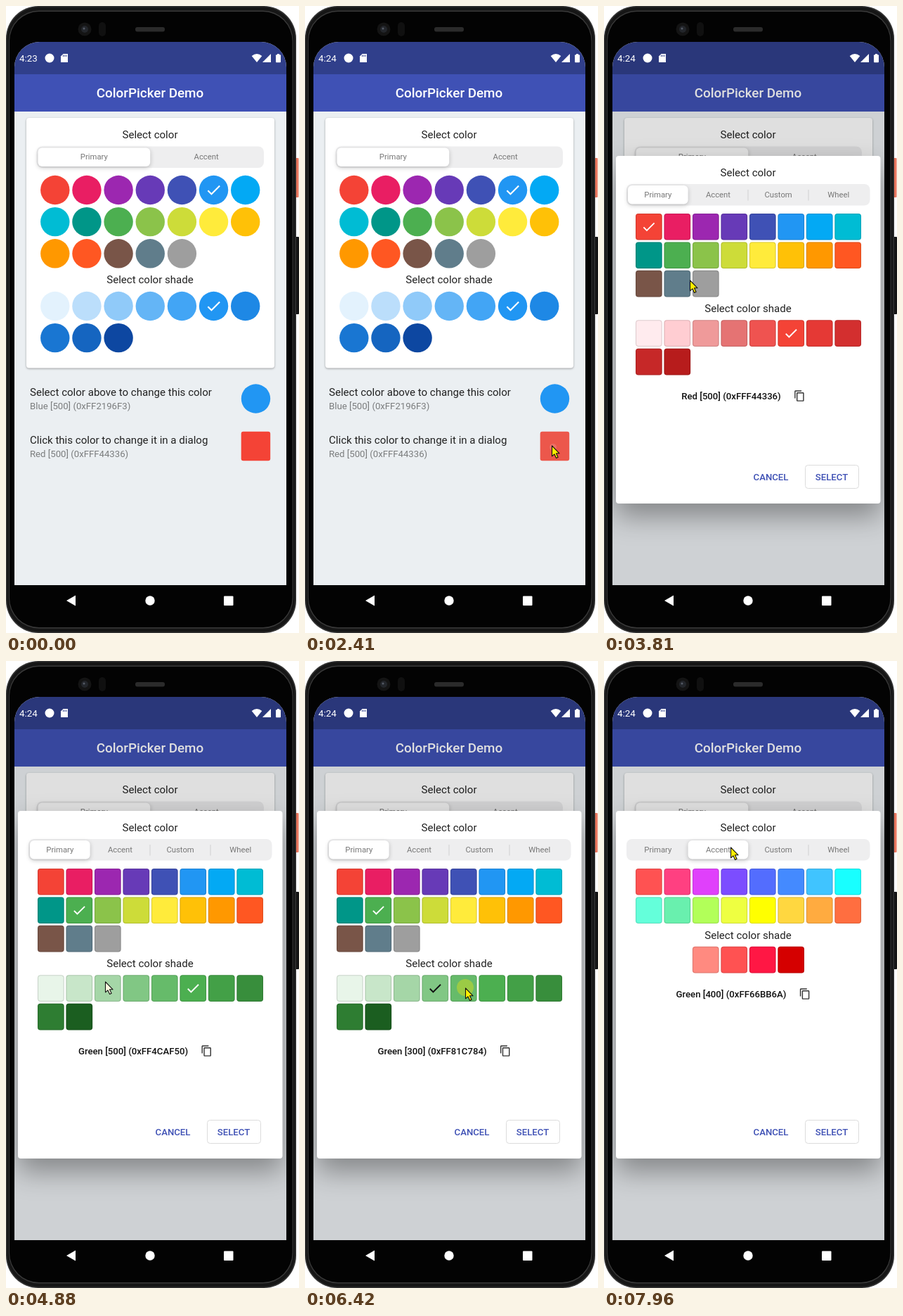
An HTML page with a canvas for the animation above (8 s loop, 417 by 891 pixels).

```html
<!DOCTYPE html>
<html lang="en">
<head>
<meta charset="utf-8">
<title>ColorPicker Demo</title>
<style>
html, body { margin: 0; width: 100%; height: 100%; overflow: hidden; background: #fff; }
canvas { display: block; }
</style>
</head>
<body>
<canvas id="stage" width="417" height="891"></canvas>
<script>
const c = document.getElementById('stage').getContext('2d');
const LOOP = 8000;
const hex = s => s.split(' ').map(v => '#' + v);

const primary = hex('F44336 E91E63 9C27B0 673AB7 3F51B5 2196F3 03A9F4 00BCD4 009688 4CAF50 8BC34A CDDC39 FFEB3B FFC107 FF9800 FF5722 795548 607D8B 9E9E9E');
const accent = hex('FF5252 FF4081 E040FB 7C4DFF 536DFE 448AFF 40C4FF 18FFFF 64FFDA 69F0AE B2FF59 EEFF41 FFFF00 FFD740 FFAB40 FF6E40');
const blues = hex('E3F2FD BBDEFB 90CAF9 64B5F6 42A5F5 2196F3 1E88E5 1976D2 1565C0 0D47A1');
const reds = hex('FFEBEE FFCDD2 EF9A9A E57373 EF5350 F44336 E53935 D32F2F C62828 B71C1C');
const greens = hex('E8F5E9 C8E6C9 A5D6A7 81C784 66BB6A 4CAF50 43A047 388E3C 2E7D32 1B5E20');
const redAccents = hex('FF8A80 FF5252 FF1744 D50000');

// Dialog selections: start time, primary index, shades, shade index, label
const picks = [
  [2640, 0, reds, 5, 'Red [500] (0xFFF44336)'],
  [4270, 9, greens, 5, 'Green [500] (0xFF4CAF50)'],
  [5180, 9, greens, 2, 'Green [200] (0xFFA5D6A7)'],
  [5800, 9, greens, 3, 'Green [300] (0xFF81C784)'],
  [6570, 9, greens, 4, 'Green [400] (0xFF66BB6A)']
];
// Pointer tip: time, x, y
const path = [
  [1020, 410, 657], [1330, 351, 624], [3420, 351, 624], [3810, 122, 389],
  [4110, 112, 339], [4430, 112, 339], [4880, 141, 455], [5030, 145, 462],
  [5180, 145, 462], [5420, 197, 464], [5800, 197, 464], [6040, 228, 464],
  [6570, 228, 464], [7030, 180, 275], [7110, 180, 264]
];
const clicks = [[2260, 2400], [4110, 4270], [5030, 5180], [5570, 5800], [6420, 6570], [7260, 7420]];

const checkIcon = new Path2D('M9 16.17L4.83 12l-1.42 1.41L9 19 21 7l-1.41-1.41z');
const copyIcon = new Path2D('M16 1H4c-1.1 0-2 .9-2 2v14h2V3h12V1zm3 4H8c-1.1 0-2 .9-2 2v14c0 1.1.9 2 2 2h11c1.1 0 2-.9 2-2V7c0-1.1-.9-2-2-2zm0 16H8V7h11v14z');
const arrow = new Path2D('M0 0V15L3.4 12L6.1 17.6L8.6 16.4L6 11H10.6Z');

const ease = p => { p = Math.min(1, Math.max(0, p)); return p * p * (3 - 2 * p); };

function rect(x, y, w, h, r, fill) {
  c.beginPath();
  c.roundRect(x, y, w, h, r);
  c.fillStyle = fill;
  c.fill();
}
function outline(x, y, w, h, r, color) {
  c.beginPath();
  c.roundRect(x, y, w, h, r);
  c.strokeStyle = color;
  c.lineWidth = 1;
  c.stroke();
}
function disc(x, y, r, fill) {
  c.beginPath();
  c.arc(x, y, r, 0, 7);
  c.fillStyle = fill;
  c.fill();
}
function poly(fill, ...p) {
  c.beginPath();
  for (let i = 0; i < p.length; i += 2) c.lineTo(p[i], p[i + 1]);
  c.fillStyle = fill;
  c.fill();
}
function text(s, x, y, size, fill, weight = 400, align = 'center') {
  c.font = `${weight} ${size}px Roboto, sans-serif`;
  c.textAlign = align;
  c.fillStyle = fill;
  c.fillText(s, x, y);
}
function icon(shape, x, y, size, fill) {
  c.save();
  c.translate(x - size / 2, y - size / 2);
  c.scale(size / 24, size / 24);
  c.fillStyle = fill;
  c.fill(shape);
  c.restore();
}
function raised(x, y, w, h, r, dy, blur, alpha) {
  c.save();
  c.shadowColor = `rgba(0,0,0,${alpha})`;
  c.shadowBlur = blur;
  c.shadowOffsetY = dy;
  rect(x, y, w, h, r, '#fff');
  c.restore();
}

function phone() {
  c.fillStyle = '#fff';
  c.fillRect(0, 0, 417, 891);
  rect(411, 216, 5.5, 56, 1, '#e8755c');
  rect(411, 328, 6, 110, 1, '#151515');
  rect(0, 0, 413, 891, 46, '#333');
  rect(1.5, 1.5, 410, 888, 45, '#161616');
  rect(4, 6.5, 404.5, 878, 43, '#3a3a3a');
  rect(5, 8, 402.5, 875, 42, '#030303');
  rect(184, 30, 42, 6.5, 3, '#2b2b2b');
  disc(112, 33, 9.5, '#141414');
  disc(112, 33, 5, '#23262b');
  disc(111, 32, 1.5, '#555b66');
  rect(132, 23, 10, 20, 5, '#101010');
  poly('#fff', 86, 845, 99, 837.5, 99, 852.5);
  disc(205, 845, 6.7, '#fff');
  rect(310, 838.5, 13.5, 13.5, 1, '#fff');
}

function status(t) {
  text(t < 240 ? '4:23' : '4:24', 19, 79, 13.4, '#fff', 400, 'left');
  disc(62, 74, 6.5, '#fff');
  poly('#fff', 81.5, 68, 88, 68, 88, 80, 78, 80, 78, 71.5);
  c.fillStyle = '#303f8b';
  for (let i = 0; i < 3; i++) c.fillRect(81 + 2.2 * i, 69.5, 1, 2.5);
  c.beginPath();
  c.moveTo(357, 80);
  c.lineTo(349.7, 71);
  c.quadraticCurveTo(357, 65, 364.3, 71);
  c.fillStyle = '#fff';
  c.fill();
  poly('#fff', 377, 68, 377, 80, 365, 80);
  rect(384, 69.3, 7, 11, 1, '#fff');
  c.fillRect(386, 68, 3, 2);
}

function tabs(x, y, w, h, names, pos) {
  rect(x, y, w, h, 8, '#eeeeef');
  const x0 = x + 2, step = (w - 4) / names.length, left = x0 + step * pos;
  names.forEach((n, i) => {
    const d = x0 + step * i;
    if (i && Math.abs(d - left) > 5 && Math.abs(d - left - step) > 5) {
      c.fillStyle = '#d0d0d2';
      c.fillRect(Math.round(d) - 0.5, y + 8, 1, h - 15);
    }
  });
  raised(left, y + 2, step, h - 4, 6, 2, 6, 0.22);
  names.forEach((n, i) => text(n, x0 + step * (i + 0.5), Math.floor(y + h / 2 + 4), 11.3, '#777'));
}

function circles(colors, y, sel) {
  colors.forEach((col, i) => {
    const cx = 69.8 + 45.15 * (i % 7), cy = y + 45.15 * Math.floor(i / 7);
    disc(cx, cy, 20.7, col);
    if (i === sel) icon(checkIcon, cx, cy, 24.9, '#fff');
  });
}

function squares(colors, x, y, sel, mark = '#fff') {
  colors.forEach((col, i) => {
    const sx = x + 40.48 * (i % 8), sy = y + 40.48 * Math.floor(i / 8);
    rect(sx, sy, 37.66, 37.66, 3.8, col);
    outline(sx + 0.5, sy + 0.5, 36.66, 36.66, 3.3, 'rgba(0,0,0,.14)');
    if (i === sel) icon(checkIcon, sx + 18.8, sy + 18.8, 22.6, mark);
  });
}

function page(t) {
  c.fillStyle = '#ebeff2';
  c.fillRect(12, 51, 387, 772);
  c.fillStyle = '#303f8b';
  c.fillRect(12, 51, 387, 46);
  c.fillStyle = '#3f51b5';
  c.fillRect(12, 97, 387, 53);
  text('ColorPicker Demo', 205, 130, 18.83, '#fff', 500);

  raised(29, 159, 353, 355.5, 4, 1, 3, 0.35);
  text('Select color', 205, 188, 15.07, '#222');
  tabs(43.5, 199.5, 323.5, 30.5, ['Primary', 'Accent'], 0);
  circles(primary, 261.5, 5);
  text('Select color shade', 205, 394, 15.07, '#222');
  circles(blues, 426.5, 5);

  text('Select color above to change this color', 34, 554, 15.07, '#222', 400, 'left');
  text('Blue [500] (0xFF2196F3)', 34, 573, 13.18, '#7b7d7e', 400, 'left');
  disc(355.5, 558, 20.7, '#2196f3');
  text('Click this color to change it in a dialog', 34, 622, 15.07, '#222', 400, 'left');
  text('Red [500] (0xFFF44336)', 34, 641, 13.18, '#7b7d7e', 400, 'left');
  rect(334.7, 604.7, 41.5, 41.5, 3, t >= 2340 ? '#ec574b' : '#f44336');
  if (t >= 2400) disc(353, 627, 5, 'rgba(255,255,255,.15)');
}

function dialog(t) {
  c.fillStyle = 'rgba(0,0,0,.125)';
  c.fillRect(12, 51, 387, 772);
  raised(17, 213, 376.5, 494, 4, 18, 38, 0.36);
  const [, main, shades, shade, label] = picks.filter(p => t >= p[0]).pop();
  const p = ease((t - 7420) / 460), up = 40.48 * p;

  text('Select color', 205, 242, 15.07, '#222');
  tabs(32, 253, 346.5, 30.5, ['Primary', 'Accent', 'Custom', 'Wheel'], ease((t - 7340) / 260));

  c.globalAlpha = 1 - p;
  squares(primary, 45, 294.9, main);
  squares(shades, 45, 446.3 - up, shade, shade < 5 ? '#111' : '#fff');
  c.globalAlpha = p;
  squares(accent, 45, 294.9);
  squares(redAccents, 125.9, 446.3 - up);
  c.globalAlpha = 1;

  text('Select color shade', 205, 435 - up, 15.07, '#222');
  text(label, 181, 559 - 2 * up, 13.18, '#111', 500);
  icon(copyIcon, 181 + c.measureText(label).width / 2 + 26.5, 554 - 2 * up, 17, '#333');

  text('CANCEL', 237.5, 674, 13.18, '#3f51b5', 500);
  outline(286.5, 652.5, 76, 33, 4, '#dcdcdc');
  text('SELECT', 324, 674, 13.18, '#3f51b5', 500);
}

// The pointer advances in steps of about 77 ms.
function tip(t) {
  const i = path.findIndex(k => k[0] > t);
  if (i < 0) return path[path.length - 1].slice(1);
  const [t0, x0, y0] = path[i - 1], [t1, x1, y1] = path[i];
  const p = ease(Math.floor((t - t0 + 4) / 77) * 77 / (t1 - t0));
  return [x0 + (x1 - x0) * p, y0 + (y1 - y0) * p];
}

function pointer(t) {
  if (t < path[0][0]) return;
  const [x, y] = tip(t);
  const click = clicks.find(k => t >= k[0] && t < k[1]);
  if (click) disc(x, y, 12, `rgba(255,235,0,${t - click[0] < 75 ? 0.35 : 0.65})`);
  c.save();
  c.translate(x + 0.5, y + 0.8);
  c.lineJoin = 'round';
  c.lineWidth = 1.1;
  c.strokeStyle = '#111';
  c.fillStyle = t >= 4800 && t < 5110 ? '#fdfbe0' : '#ffee00';
  c.fill(arrow);
  c.stroke(arrow);
  c.restore();
}

function draw(now) {
  const t = now % LOOP;
  phone();
  c.save();
  c.beginPath();
  c.roundRect(12, 51, 387, 772, [36, 36, 0, 0]);
  c.clip();
  page(t);
  if (t >= 2640) dialog(t);
  status(t);
  c.restore();
  pointer(t);
}

let start;
function loop(now) {
  start ??= now;
  draw(now - start);
  requestAnimationFrame(loop);
}
requestAnimationFrame(loop);
</script>
</body>
</html>
```
